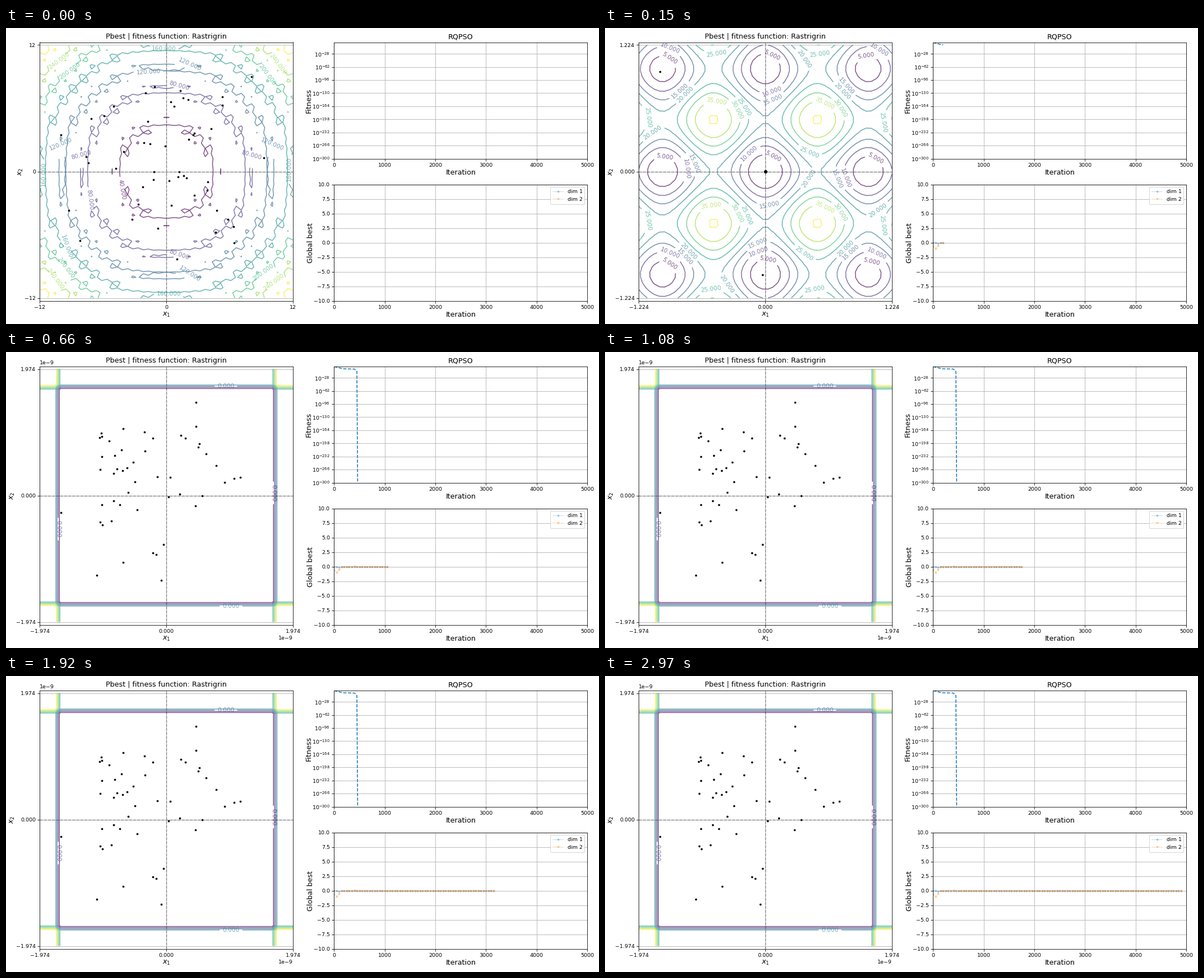
These frames come from a looping animation (1058x529 px, 3 s). A matplotlib script:

```python
import numpy as np
import matplotlib.pyplot as plt
from matplotlib.animation import FuncAnimation
from matplotlib.ticker import MaxNLocator

W, H = 1058, 529
FRAMES, STEP = 100, 50
LAST = 10  # the swarm stops moving here
SWARM = 50

plt.rcParams.update({
    "font.family": "DejaVu Sans", "axes.titlesize": 12,
    "axes.labelsize": 12, "xtick.labelsize": 9, "ytick.labelsize": 9})

iters = np.arange(FRAMES) * STEP
# the fitness falls slowly, then drops to exactly zero
fitness = np.where(
    iters < 500,
    10 ** np.interp(iters, [0, 150, 200, 400, 450],
                    [1.2, -3.8, -4.6, -5.2, -11.5]), 0)
best = np.zeros((2, FRAMES))
best[0, 2] = -0.1
best[1, :4] = -0.6, -0.97, -0.5, -0.08
best[1, 8] = 0.08


def view_limit(k):
    return 10 ** np.interp(k, [0, 5, LAST], np.log10([12, 1.224, 1.974e-9]))


def swarm(k):
    rng = np.random.default_rng(k)
    edge = view_limit(k) / 1.2
    if 0 < k <= 5:
        # particles settle into whole-number minima, two lag behind
        wells = np.round(rng.normal(0, 1.8 * 0.5 ** (k - 1), (SWARM, 2)))
        pts = wells + rng.normal(0, 0.25 * 0.3 ** (k - 1), (SWARM, 2))
        pts[:2] = (-edge, 0.95 * edge), (-0.03, -1)
        return np.clip(pts, -edge, edge)
    drift = 0.5 * k / LAST
    x = rng.triangular(-1, -drift, 1, SWARM)
    y = rng.triangular(-1, drift, 1, SWARM)
    x[0] = -1
    return np.column_stack([x, y]) * edge


def rastrigin(x, y):
    return sum(v ** 2 - 10 * np.cos(2 * np.pi * v) + 10 for v in (x, y))


def add_axes(x0, y0, x1, y1):
    return fig.add_axes([x0 / W, 1 - y1 / H, (x1 - x0) / W, (y1 - y0) / H])


def draw_map(k):
    lim = view_limit(k)
    ax = ax_map
    ax.clear()
    ax.set_title("Pbest | fitness function: Rastrigrin")
    ax.set_xlabel("$x_1$", labelpad=2)
    ax.set_ylabel("$x_2$", labelpad=0)
    ax.set_xlim(-lim, lim)
    ax.set_ylim(-lim * 462 / 452, lim * 462 / 452)
    ax.set_xticks([-lim, 0, lim])
    ax.set_yticks([-lim, 0, lim])
    ax.grid(True)
    ax.axhline(0, color="gray", ls="--", lw=1.3)
    ax.axvline(0, color="gray", ls="--", lw=1.3)
    grid = np.linspace(-lim, lim, 50)
    x, y = np.meshgrid(grid, grid)
    z = rastrigin(x, y)
    levels = MaxNLocator(9).tick_values(z.min(), z.max())
    levels = levels[(levels > z.min()) & (levels < z.max())]
    lines = ax.contour(x, y, z, levels, cmap="viridis", alpha=0.65)
    ax.clabel(lines, inline=True, fontsize=10, fmt="%1.3f")
    ax.plot(*swarm(k).T, "k.", ms=5)


fig = plt.figure(figsize=(14, 7), dpi=W / 14)
ax_map = add_axes(60.4, 25.5, 512, 487.5)
ax_fit = add_axes(585.4, 25.5, 1037, 233.5)
ax_best = add_axes(585.4, 279.5, 1037, 487.5)

ax_fit.set_title("RQPSO")
ax_fit.set_yscale("log")
ax_fit.set_ylim(1e-300, 1e2)
ax_best.set_ylim(-10, 10)
for ax, name in ((ax_fit, "Fitness"), (ax_best, "Global best")):
    ax.set_xlim(0, 5000)
    ax.set_xlabel("Iteration", labelpad=2)
    ax.set_ylabel(name, labelpad=-1)
    ax.grid(True)

fit_line, = ax_fit.plot([], [], "C0--")
best_lines = [ax_best.plot([], [], f"C{d}.-", lw=0.8, ms=5, alpha=0.3,
                           label=f"dim {d + 1}")[0] for d in range(2)]
ax_best.legend(loc="upper right", fontsize=9)

shown = None


def update(i):
    global shown
    k = min(i, LAST)
    if k != shown:
        draw_map(k)
        shown = k
    fit_line.set_data(iters[:i], fitness[:i])
    for line, values in zip(best_lines, best):
        line.set_data(iters[:i], values[:i])
    return [fit_line, *best_lines]


anim = FuncAnimation(fig, update, frames=FRAMES, interval=30,
                     init_func=lambda: update(0), repeat=True, repeat_delay=0)
plt.show()
```
